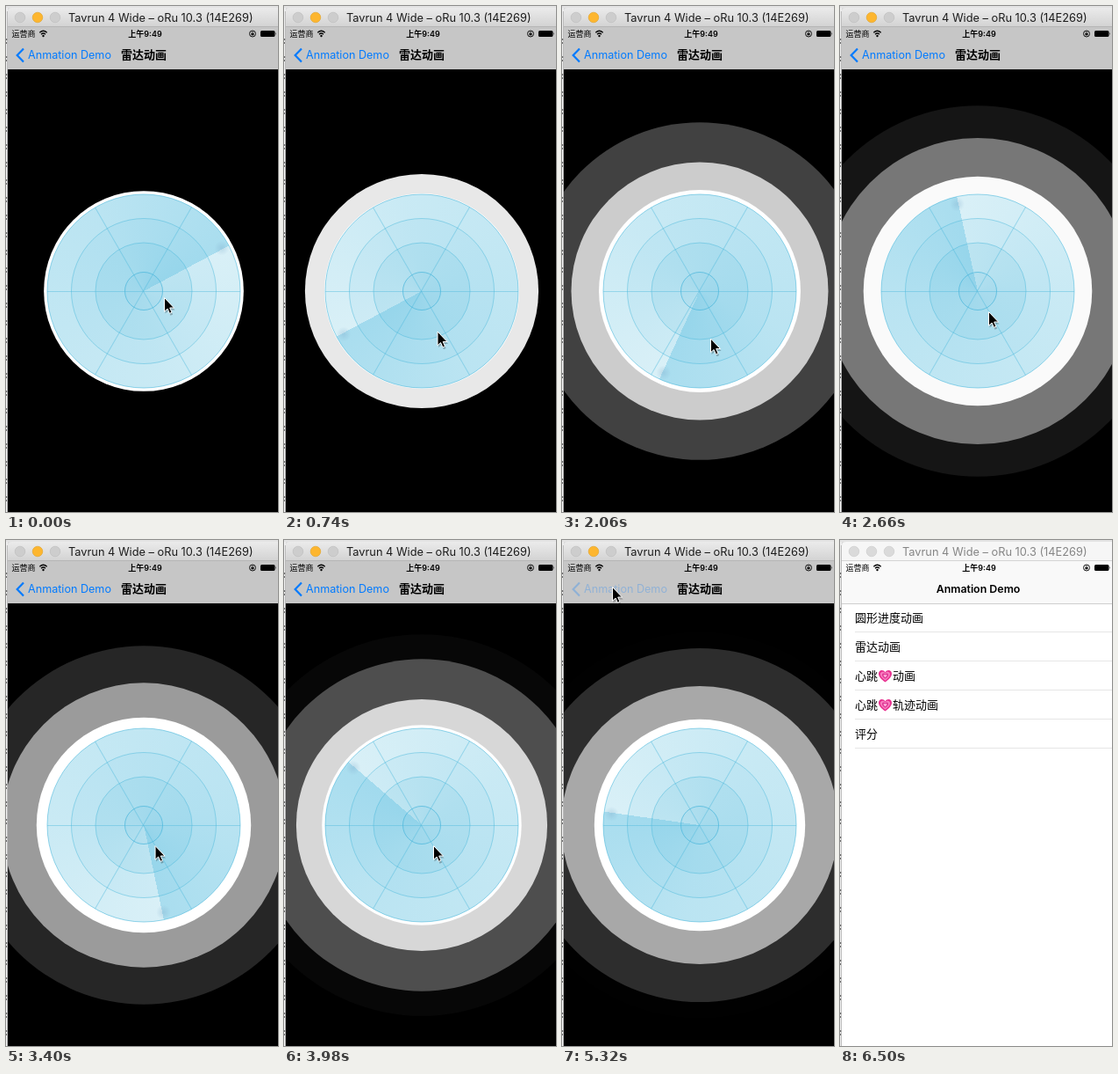
Recreate the animation shown at these times as an HTML page. Size 310 by 575 pixels, loop 6.53 s.

```html
<!DOCTYPE html>
<html lang="zh">
<head>
<meta charset="utf-8">
<title>雷达动画</title>
<style>
  html, body { margin: 0; width: 100%; height: 100%; overflow: hidden; background: #dcdcdc; }
  #stage { position: relative; width: 310px; height: 575px; overflow: hidden; }
  #stage > *, #radar > * { position: absolute; left: 0; top: 0; }
  svg { display: block; overflow: hidden; }
  text { font-family: Inter, "Noto Sans CJK SC", "Noto Sans CJK", sans-serif; font-size: 13px; white-space: pre; }
  #screen { width: 310px; height: 575px; clip-path: inset(24px 0 0 2px); }
  #screen > * { position: absolute; left: 0; top: 0; }
  #radar { width: 310px; height: 575px; background: #000; }
  #radar #sweep {
    left: 47px; top: 214px; width: 220px; height: 220px; border-radius: 50%;
    background: conic-gradient(from 90deg, rgba(84,188,224,0), rgba(84,188,224,.12) 30%, rgba(84,188,224,.23) 75%, rgba(84,188,224,.36));
  }
  #sweep i {
    position: absolute; left: 102px; top: 101px; width: 0; height: 0;
  }
  #sweep i::after {
    content: ""; position: absolute; left: 101px; top: -1px; width: 17px; height: 17px; border-radius: 50%;
    background: radial-gradient(closest-side, rgba(130,175,205,.36), rgba(130,175,205,0));
  }
</style>
</head>
<body>
<div id="stage">
  <div id="screen">
    <svg id="list" width="310" height="575"><rect width="310" height="575" fill="#fff"/></svg>
    <div id="radar">
      <svg id="waves" width="310" height="575"></svg>
      <svg id="disc" width="310" height="575"></svg>
      <div id="sweep"><i></i></div>
      <svg id="grid" width="310" height="575" fill="none" stroke="#4fb9dc"></svg>
    </div>
    <svg id="nav" width="310" height="575">
      <rect id="bar" y="24" width="310" height="48"/>
      <rect id="rule" y="72" width="310" height="1" fill="#cfcfcf"/>
      <g id="back" fill="#007aff">
        <path id="chevron" d="M20 48.5L12.7 56L20 63.5" fill="none" stroke="#007aff" stroke-width="2.2"/>
        <text id="label" x="25" y="60" style="font-size:12.6px">Anmation Demo</text>
      </g>
      <text id="title" x="131" y="60" font-weight="700">雷达动画</text>
      <text id="home" x="157.5" y="60" text-anchor="middle" font-weight="600" style="font-size:12.4px">Anmation Demo</text>
      <g id="status">
        <text x="6.5" y="35" style="font-size:9px">运营商</text>
        <text x="158.5" y="35" text-anchor="middle" font-weight="600" style="font-size:9px">上午9:49</text>
        <path d="M38.3 30.2Q42.5 26.4 46.7 30.2M40 32.2Q42.5 29.9 45 32.2" fill="none" stroke="#000" stroke-width="1.3"/>
        <circle cx="42.5" cy="34" r="1.2"/>
        <circle cx="281" cy="31.5" r="3.5" fill="none" stroke="#000" stroke-width=".9"/>
        <rect x="279.5" y="31" width="3" height="2.3"/>
        <path d="M280.1 31.2v-.8a.9.9 0 0 1 1.8 0v.8" fill="none" stroke="#000" stroke-width=".6"/>
        <rect x="290" y="28" width="16.5" height="7" rx="1.6"/>
        <path d="M307.3 30v3q1.2-1.5 0-3z"/>
      </g>
    </svg>
  </div>
  <svg id="chrome" width="310" height="575">
    <defs>
      <linearGradient id="metal" x2="0" y2="1"><stop stop-color="#ebebeb"/><stop offset="1" stop-color="#d2d2d2"/></linearGradient>
    </defs>
    <rect width="2" height="575" fill="#ededed"/>
    <rect x="1.2" y="6" width=".8" height="569" fill="#b0b0b0"/>
    <g id="scraps" stroke="#444" stroke-width="1.3"></g>
    <rect width="310" height="2" fill="#e3e3e3"/>
    <path id="head" d="M2 24V7Q2 2 7 2H310V24z"/>
    <path id="edge" d="M2 23.5H310" stroke="#b5b5b5"/>
    <g id="lights" stroke-width=".6"></g>
    <text id="caption" x="71" y="18" style="font-size:12.8px">Tavrun 4 Wide – oRu 10.3 (14E269)</text>
  </svg>
  <svg id="cursor" width="20" height="24">
    <path d="M3 3V18.2L6.5 15L8.9 20.4L11.6 19.2L9.2 14H14z" fill="#000" opacity=".25" transform="translate(.6 1.4)"/>
    <path d="M2.5 1.5V17.2L6.1 14L8.4 19.3L11 18.2L8.7 13H13.5z" fill="#000" stroke="#fff" stroke-width="1"/>
  </svg>
</div>
<script>
const LOOP = 6530, STEP = 147.8, LEAD = 12;
const CX = 157, CY = 324, R = 110;
const $ = id => document.getElementById(id);

function add(parent, tag, attrs, text) {
  const el = document.createElementNS("http://www.w3.org/2000/svg", tag);
  for (const k in attrs) el.setAttribute(k, attrs[k]);
  if (text) el.textContent = text;
  return parent.appendChild(el);
}

// Linear interpolation in rows of [x, value, value, ...]
function track(rows, x, col = 1) {
  if (x <= rows[0][0]) return rows[0][col];
  for (let i = 1; i < rows.length; i++) {
    const a = rows[i - 1], b = rows[i];
    if (x <= b[0]) return a[col] + (b[col] - a[col]) * (x - a[0]) / (b[0] - a[0]);
  }
  return rows[rows.length - 1][col];
}

// cubic-bezier(.42, 0, .58, 1)
function easeInOut(u) {
  let lo = 0, hi = 1;
  for (let i = 0; i < 24; i++) {
    const s = (lo + hi) / 2, q = 1 - s;
    if (1.26 * q * q * s + 1.74 * q * s * s + s * s * s < u) lo = s; else hi = s;
  }
  return lo * lo * (3 - 2 * lo);
}

const SWEEP = [[0, -28], [10, 332], [18, 617.5], [23, 798], [32, 1119], [36, 1268], [40, 1412]];
const POINTER = [[0, 180, 331], [10, 169, 408], [18, 169, 347], [27, 170, 347], [32, 59, 56], [36, 57, 53], [37, 57, 53], [40, 245, 564]];
const POP = [[36, 0], [37, .3], [38, .86], [39, 1]];
const FADE = [[0, 1], [.13, 1], [.18, .97], [.214, .9], [.4545, .56], [.5, .5], [1, 0]];

// Radar face
[[110, "#d9f0f7"], [82.5, "#cdebf5"], [55, "#bce4f1"], [22, "#b4e0ef"]]
  .forEach(([r, fill]) => add($("disc"), "circle", { cx: CX, cy: CY, r, fill }));
[[110, .6], [82.5, .5], [55, .5], [21.5, .75]]
  .forEach(([r, opacity]) => add($("grid"), "circle", { cx: CX, cy: CY, r, opacity }));
for (let a = 0; a < 180; a += 60)
  add($("grid"), "path", { d: `M${CX - R} ${CY + .5}h${2 * R}`, transform: `rotate(${a} ${CX} ${CY})`, opacity: .45 });

const waves = Array.from({ length: 7 }, () => add($("waves"), "circle", { cx: CX, cy: CY, fill: "#fff" }));

// List page
function heart(x, y) {
  [[1, "#e8308f"], [.74, "#f77fc0"], [.48, "#e03a96"], [.25, "#ffb3dc"]].forEach(([k, fill]) =>
    add($("list"), "path", {
      d: "M0 7C-4 4-7.5 1-7.5-2.6C-7.5-7-2-7.8 0-4C2-7.8 7.5-7 7.5-2.6C7.5 1 4 4 0 7z",
      fill, transform: `translate(${x} ${y}) scale(${k})`
    }));
}
["圆形进度动画", "雷达动画", "心跳|动画", "心跳|轨迹动画", "评分"].forEach((row, i) => {
  const y = 93 + 33 * i, [first, rest] = row.split("|");
  add($("list"), "text", { x: 17, y }, first);
  if (rest) {
    heart(51.5, y - 4.5);
    add($("list"), "text", { x: 60, y }, rest);
  }
  add($("list"), "rect", { x: 17, y: 104 + 33 * i, width: 293, height: 1, fill: "#e6e6e6" });
});

// Window frame
const lights = [16, 36, 56].map(cx => add($("lights"), "circle", { cx, cy: 13, r: 5.8 }));
for (let y = 38; y < 570; y += 20) add($("scraps"), "path", { d: `M0 ${y}h1.2M0 ${y + 4}h1` });

function setActive(on) {
  $("head").setAttribute("fill", on ? "url(#metal)" : "#f6f6f6");
  $("edge").setAttribute("stroke", on ? "#b5b5b5" : "#d4d4d4");
  $("caption").setAttribute("fill", on ? "#1c1c1c" : "#858585");
  lights.forEach((c, i) => {
    const lit = on && i === 1;
    c.setAttribute("fill", lit ? "#fdb62f" : on ? "#cdcdcd" : "#dadada");
    c.setAttribute("stroke", lit ? "#dfa023" : on ? "#bababa" : "#c8c8c8");
  });
}

function drawWaves(ms) {
  waves.forEach((c, n) => {
    const u = (ms + 530 - 1000 * n) / 4000, on = u > 0 && u < 1;
    const e = on ? easeInOut(u) : 0;
    c.setAttribute("r", on ? R * (1 + e) : 0);
    c.setAttribute("opacity", track(FADE, e));
  });
}

function drawPop(p, step) {
  $("radar").style.transform = `translateX(${310 * p}px)`;
  $("radar").style.visibility = p < 1 ? "visible" : "hidden";
  $("list").style.transform = `translateX(${-93 * (1 - p)}px)`;
  const g = Math.round(198 + 51 * p);
  $("bar").setAttribute("fill", `rgb(${g},${g},${g})`);
  $("rule").setAttribute("opacity", p);
  $("back").setAttribute("opacity", (step >= 36 ? .27 : 1) * (1 - p));
  $("label").setAttribute("transform", `translate(${85 * p})`);
  $("title").setAttribute("transform", `translate(${150 * p})`);
  $("title").setAttribute("opacity", 1 - p);
  $("home").setAttribute("transform", `translate(${-85 * (1 - p)})`);
  $("home").setAttribute("opacity", p);
}

function render(t) {
  const step = Math.floor((t + LEAD) / STEP);
  drawWaves(step * STEP);
  $("sweep").style.transform = `rotate(${track(SWEEP, step)}deg)`;
  drawPop(track(POP, step), step);
  $("cursor").style.transform = `translate(${track(POINTER, step) - 2}px,${track(POINTER, step, 2) - 1}px)`;
  $("cursor").style.visibility = step < 41 ? "visible" : "hidden";
  setActive(t < 6500);
}

const start = performance.now();
function tick() {
  render((performance.now() - start) % LOOP);
  requestAnimationFrame(tick);
}
tick();
</script>
</body>
</html>
```
